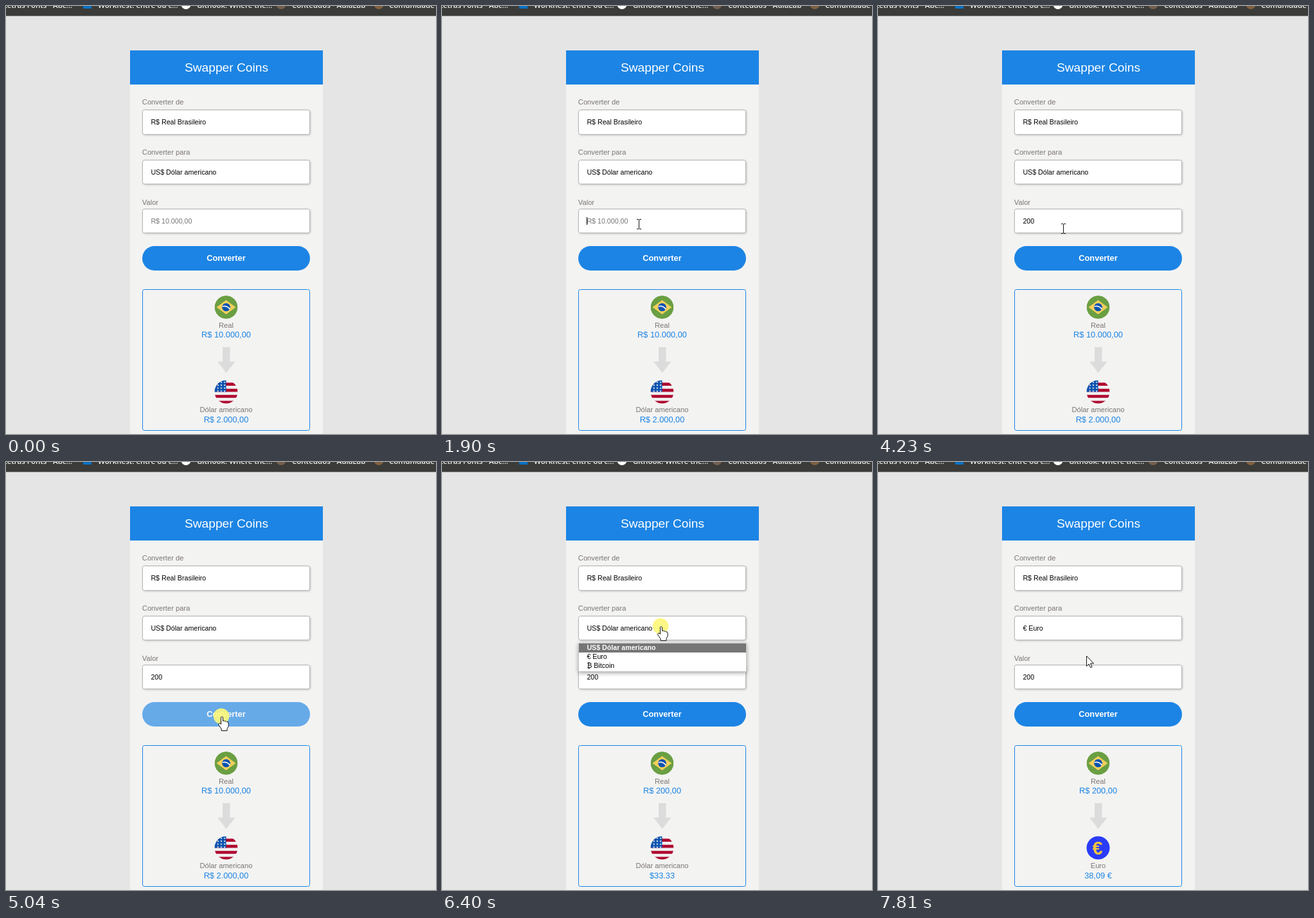
An HTML page for the animation above (8 s loop, 669 by 665 pixels).

```html
<!DOCTYPE html>
<html lang="pt">
<head>
<meta charset="utf-8">
<title>Conversor</title>
<style>
  html, body { margin: 0; width: 100%; height: 100%; overflow: hidden; background: #e5e5e5; }
  svg { display: block; width: 669px; height: 665px; font-family: "Liberation Sans", Arial, sans-serif; }
  .bar { font: 600 11.5px "Open Sans", sans-serif; fill: #f4f4f4; }
  .label { font-size: 11.2px; fill: #7a7573; }
  .field { font-size: 10.67px; fill: #000; }
  .value { font-size: 12.8px; fill: #1c84e4; }
  .mid { text-anchor: middle; }
  .box { fill: #fff; stroke: #b4b4b4; filter: drop-shadow(1.6px 1.6px 1.6px rgba(0,0,0,.2)); }
  .list { fill: #fff; stroke: #c9c9c9; filter: drop-shadow(0 2px 3px rgba(0,0,0,.35)); }
</style>
</head>
<body>
<svg viewBox="0 0 669 665">
  <defs>
    <clipPath id="round"><circle r="18"/></clipPath>
  </defs>
  <rect width="669" height="665" fill="#e5e5e5"/>
  <rect width="669" height="15.5" fill="#3b3b39"/>
  <g class="bar">
    <text x="103" y="2.5" text-anchor="end">Letras Fonts - Abc...</text>
    <text x="143" y="2.5">Worknest: entre ou c...</text>
    <text x="297" y="2.5">Gitnook: Where the...</text>
    <text x="445" y="2.5">Conteúdos - AulaLab</text>
    <text x="596" y="2.5">Comunidade | Aula</text>
  </g>
  <rect x="120" y="-9" width="13" height="13" fill="#0a72c4"/>
  <circle cx="280" cy="-2.5" r="7.5" fill="#fff"/>
  <circle cx="428" cy="-2.5" r="7.5" fill="#75604f"/>
  <circle cx="580" cy="-2.5" r="7.5" fill="#806040"/>

  <rect x="193" y="69" width="300" height="600" fill="#f3f3f2"/>
  <rect x="193" y="69" width="300" height="53" fill="#1c84e4"/>
  <text class="mid" x="343" y="102" font-size="19.2" fill="#fff">Swapper Coins</text>

  <g class="label">
    <text x="211.8" y="153">Converter de</text>
    <text x="211.8" y="231">Converter para</text>
    <text x="211.8" y="309">Valor</text>
  </g>
  <g class="box">
    <rect x="212.5" y="161.5" width="260" height="38" rx="3"/>
    <rect x="212.5" y="239.5" width="260" height="37" rx="3"/>
    <rect x="212.5" y="315.5" width="260" height="37" rx="3"/>
  </g>
  <g class="field">
    <text x="225.4" y="184">R$ Real Brasileiro</text>
    <text id="target" x="225.4" y="262"></text>
    <text id="amount" x="225.4" y="338"></text>
  </g>
  <rect id="caret" y="328" width="1" height="12"/>

  <g id="button">
    <rect x="212" y="373" width="261" height="38" rx="19" fill="#1c84e4"/>
    <text class="mid" x="342.5" y="396" font-size="12.8" font-weight="700" fill="#fff">Converter</text>
  </g>

  <rect x="212.5" y="440.5" width="260" height="219" rx="3" fill="none" stroke="#1c84e4"/>
  <g transform="translate(342.5 468)" clip-path="url(#round)">
    <circle r="18" fill="#6b9f43"/>
    <path d="M0-11L14.9 0L0 11L-14.9 0Z" fill="#f4d05a"/>
    <circle r="6.3" fill="#0a52b0"/>
    <path d="M-6-1.2Q1-3.2 5.8 3" fill="none" stroke="#f0f0f0" stroke-width="1.7"/>
  </g>
  <text class="label mid" x="342.5" y="500">Real</text>
  <text id="from" class="value mid" x="342.5" y="515"></text>
  <path d="M337 530H348.5V552.5H356.5L342.7 570L329 552.5H337Z" fill="#dcdcdc"/>
  <g id="dollar" transform="translate(342.5 599.5)" clip-path="url(#round)">
    <circle r="18" fill="#f0f0f0"/>
    <path d="M-18-11.8H18M-18-2.4H18M-18 7H18M-18 16.4H18" stroke="#b0082f" stroke-width="4.7"/>
    <rect x="-18" y="-18" width="18" height="18" fill="#0a52b0"/>
    <g id="stars" fill="#f0f0f0"></g>
  </g>
  <g id="euro" transform="translate(342.5 599.5)">
    <circle r="18" fill="#2a3cf8"/>
    <text class="mid" x="-1" y="10" font-size="29" font-weight="700" fill="#f2c53d">€</text>
  </g>
  <text id="currency" class="label mid" x="342.5" y="631"></text>
  <text id="to" class="value mid" x="342.5" y="647"></text>

  <g id="list">
    <rect class="list" x="212.5" y="281.5" width="261" height="44"/>
    <rect id="mark" x="213" width="260" height="14" fill="#767676"/>
    <g class="field">
      <text class="option" x="225.4" y="292">US$ Dólar americano</text>
      <text class="option" x="225.4" y="306">€ Euro</text>
      <text class="option" x="225.4" y="320">₿ Bitcoin</text>
    </g>
  </g>

  <g id="pointer">
    <circle id="click" cx="-1" cy="0" r="12.3" fill="#fdf778" fill-opacity=".9"/>
    <path id="arrow" d="M.5.5V16.3L4.1 12.9L6.6 18.4L9 17.4L6.6 12H11.6Z" fill="#fff" stroke="#111"/>
    <path id="hand" d="M-1.6 1.6Q0-.6 1.5 1.6V7Q3.2 5.9 4.4 7.6Q6 6.9 7.1 8.5Q9.6 8 10 10.8V15.5L8 19.2V22.2H-1V19.6L-5.2 13.4Q-6-11.2 11.2-4 11.2"
      fill="none"/>
    <path id="ibeam" d="M-3-7.5H-.5L.5-6.8L1.5-7.5H4M.5-7V7M-3 7.5H-.5L.5 6.8L1.5 7.5H4" fill="none" stroke="#111"/>
  </g>
</svg>
<script>
const LOOP = 8000, STEP = 70;
const $ = id => document.getElementById(id);
const options = [...document.querySelectorAll('.option')];
const show = (id, on) => $(id).setAttribute('visibility', on ? 'visible' : 'hidden');
const within = (t, ...spans) => spans.some(([a, b]) => t >= a && t < b);

$('hand').setAttribute('d', 'M-1.5 12.5V1.8Q0-.8 1.5 1.8V7.5Q3.2 5.8 4.5 8Q6.3 6.7 7.3 8.8' +
  'Q9.8 8 10.2 11V15.5L8 19.5V22.5H-.8V20L-5.3 13.2Q-5.2 10-2.8 11.2Z');
$('hand').setAttribute('fill', '#fff');
$('hand').setAttribute('stroke', '#111');

for (let row = 0; row < 4; row++)
  for (let col = 0; col < 3; col++) {
    const star = document.createElementNS('http://www.w3.org/2000/svg', 'path');
    star.setAttribute('d', 'M0-1.7L.5-.5H1.7L.7.3L1 1.6L0 .8L-1 1.6L-.7.3L-1.7-.5H-.5Z');
    star.setAttribute('transform', `translate(${-12.8 + col * 5.2} ${-15 + row * 4.6})`);
    $('stars').append(star);
  }

// Each move is a list of [time, x, y]; the pointer rests at the end of a move.
const moves = [
  [[320, 571, 607], [460, 462, 500], [600, 350, 392], [670, 331, 354], [740, 325, 309], [880, 320, 258]],
  [[1210, 320, 262], [1350, 320, 295], [1560, 319, 357], [1700, 309, 343], [1840, 306, 339]],
  [[4230, 288, 346], [4300, 278, 351]],
  [[4500, 284, 356], [4640, 318, 382], [4780, 336, 395]],
  [[5760, 338, 362], [5900, 339, 328], [6040, 340, 285], [6180, 341, 255]],
  [[6600, 340, 259], [6810, 333, 284], [7020, 324, 301]]
];

function pointerAt(t) {
  const move = moves.findLast(m => m[0][0] <= t);
  if (!move) return null;
  const start = move[0][0];
  const now = start + Math.floor((t - start) / STEP) * STEP;
  const i = move.findIndex(p => p[0] > now);
  if (i < 0) return move.at(-1).slice(1);
  const [t0, x0, y0] = move[i - 1], [t1, x1, y1] = move[i];
  const k = (now - t0) / (t1 - t0);
  return [x0 + (x1 - x0) * k, y0 + (y1 - y0) * k].map(Math.round);
}

function pointerKind([x, y], open) {
  if (x < 212 || x > 473 || (open && y > 281)) return 'arrow';
  if (within(y, [239, 277], [373, 411])) return 'hand';
  return within(y, [315, 353]) ? 'ibeam' : 'arrow';
}

function draw(t) {
  const digits = [3090, 3220, 3420].filter(at => t >= at).length;
  const converted = t >= 5170, euro = t >= 7740;
  const open = within(t, [6330, 7740]);

  $('amount').textContent = digits ? '200'.slice(0, digits) : 'R$ 10.000,00';
  $('amount').style.fill = digits ? '#000' : '#757575';
  $('caret').setAttribute('x', 225 + Math.floor(digits * 5.93));
  show('caret', within(t, [1830, 2360], [2890, 3970], [4500, 5040]));

  $('target').textContent = euro ? '€ Euro' : 'US$ Dólar americano';
  $('from').textContent = converted ? 'R$ 200,00' : 'R$ 10.000,00';
  $('to').textContent = euro ? '38,09 €' : converted ? '$33.33' : 'R$ 2.000,00';
  $('currency').textContent = euro ? 'Euro' : 'Dólar americano';
  show('dollar', !euro);
  show('euro', euro);

  const at = pointerAt(t);
  const kind = at && pointerKind(at, open);
  for (const id of ['arrow', 'hand', 'ibeam']) show(id, id === kind);
  show('click', within(t, [1770, 1900], [5040, 5170], [6330, 6470], [7610, 7810]));
  if (at) $('pointer').setAttribute('transform', `translate(${at})`);

  const hover = kind === 'hand' && at[1] >= 373;
  $('button').setAttribute('opacity', !hover ? 1 : within(t, [5040, 5170]) ? .65 : .82);

  $('list').style.display = open ? '' : 'none';
  const active = at && at[1] >= 296 ? 1 : 0;
  $('mark').setAttribute('y', 282 + active * 14);
  options.forEach((option, i) => {
    option.style.fill = i === active ? '#fff' : '#000';
    option.style.fontWeight = i === active ? 700 : 400;
  });
}

function tick() {
  draw(performance.now() % LOOP);
  requestAnimationFrame(tick);
}
tick();
</script>
</body>
</html>
```
